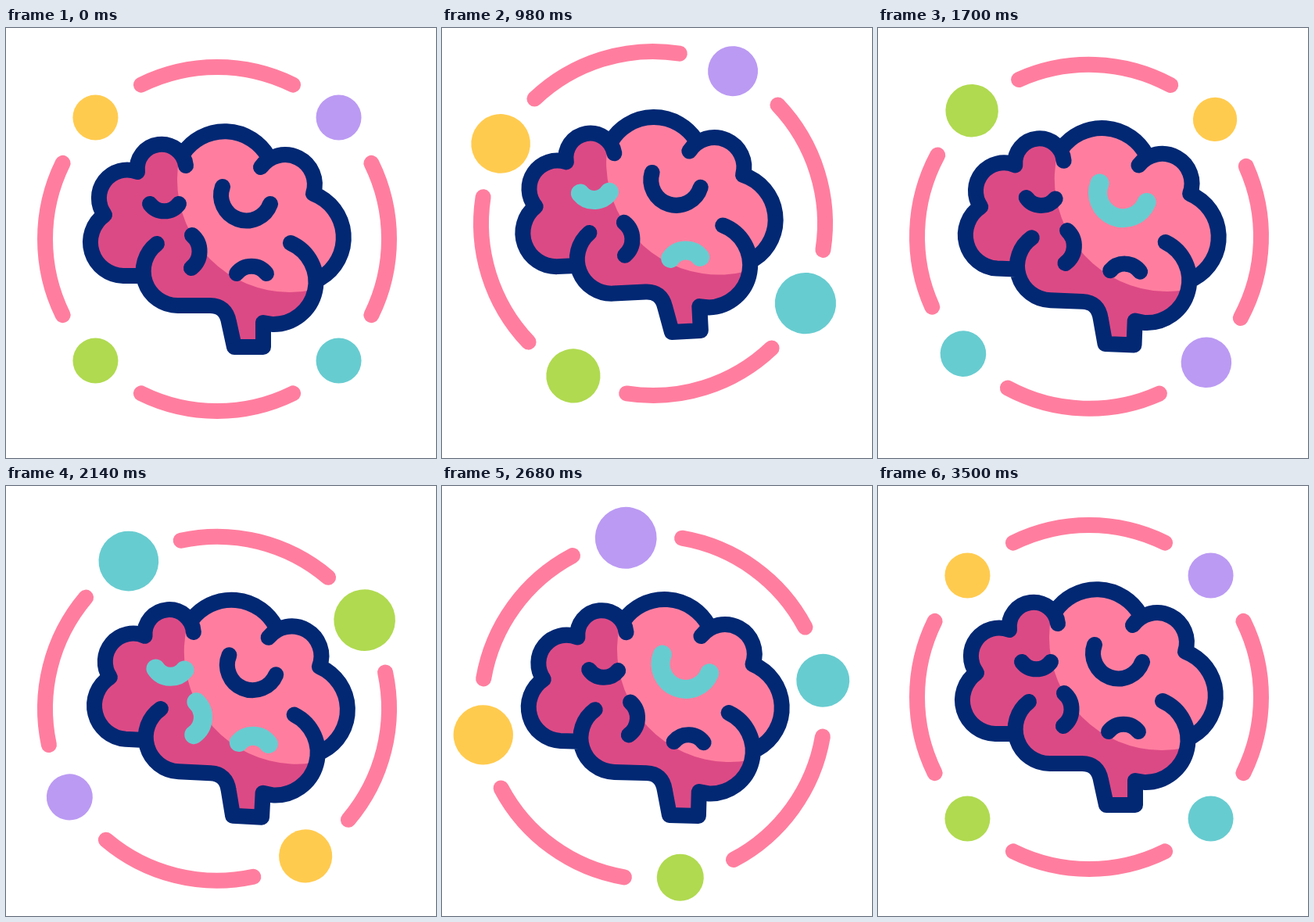
An HTML page with a canvas for the animation above (3.6 s loop, 550x550 px).

```html
<!DOCTYPE html>
<html lang="en">
<head>
<meta charset="utf-8">
<title>Brain</title>
<style>
  html, body { margin: 0; width: 100%; height: 100%; overflow: hidden; background: #fff; }
  canvas { display: block; }
</style>
</head>
<body>
<canvas id="stage" width="550" height="550"></canvas>
<script>
const ctx = document.getElementById('stage').getContext('2d');
const LOOP = 3600, STEP = 20, START = 140, END = 3500;
const CENTER = 270, RADIUS = 220;
const NAVY = '#022874', PINK = '#ff7e9f', ROSE = '#dc4a85', CYAN = '#67ccd0';
const rad = degrees => degrees * Math.PI / 180;
const clamp = x => Math.min(1, Math.max(0, x));

// Sine ease in and out.
const ease = (t, from, to) => (1 - Math.cos(Math.PI * clamp((t - from) / (to - from)))) / 2;

// Spin winds up backwards, then makes one full turn.
const spin = t => -25 * ease(t, START, 750) + 385 * ease(t, 750, 3305);

// One swing: from rest to a low point, to a high point and back to rest.
const swing = (t, low, lowAt, high, highAt) => low * ease(t, START, lowAt) +
  (high - low) * ease(t, lowAt, highAt) - high * ease(t, highAt, END);
const bob = t => swing(t, -21, 1120, 17, 2330);
const tilt = t => swing(t, -3, 880, 3, 1950);

// Two pulses, shared by all dots with a staggered delay.
const DELAY = 213;
const dotSize = t => 29 + 10.5 * ease(t, START, 700) - 11.5 * ease(t, 700, 1320) +
  11.5 * ease(t, 1320, 2080) - 10.5 * ease(t, 2080, 2830);
const dots = [
  { color: '#b0da50', angle: 225 },
  { color: CYAN, angle: 135 },
  { color: '#ffcb4f', angle: 315 },
  { color: '#bb9af3', angle: 45 }
];

const leftLobes = 'A43 43 0 0 1 126 239 A36 36 0 0 1 168 184 A31 31 0 0 1 230 176';
const topLobe = 'A64 64 0 0 1 335 164';
const rightLobes = 'A38 38 0 0 1 393 212 A60 60 0 0 1 402 320';
const base = 'A54.3 54.3 0 0 1 341 379 L329 377 V408 H292 L285 376 Q281 355 261 355 H220';
const body = new Path2D(`M150 317 ${leftLobes} L227 160 ${topLobe} L326 178 ${rightLobes}
  L396 323 ${base} A44 44 0 0 1 178 317 Z`);
const outline = new Path2D(`M174 317 H150 ${leftLobes} M227 160 ${topLobe}
  M326 178 ${rightLobes} M364 275 ${base} A44 44 0 0 1 193 276`);

// The folds take turns to light up.
const TURN = 520, FIRST_TURN = 420;
const folds = [
  ['M277 203 A32 32 0 0 0 338 225', [0, 2, 4]],
  ['M184 225 A23 23 0 0 0 221 225', [1, 3]],
  ['M295 314 A24 24 0 0 1 333 314', [1, 3]],
  ['M238 265 A27 27 0 0 1 237 307', [3]]
].map(([d, turns]) => ({ path: new Path2D(d), turns }));

function disc(x, y, r, color) {
  ctx.fillStyle = color;
  ctx.beginPath();
  ctx.arc(x, y, r, 0, 2 * Math.PI);
  ctx.fill();
}

function line(path, color, width) {
  ctx.strokeStyle = color;
  ctx.lineWidth = width;
  ctx.stroke(path);
}

function drawRing(t) {
  ctx.save();
  ctx.translate(CENTER, CENTER + bob(t));
  ctx.rotate(rad(spin(t)));
  for (let i = 0; i < 4; i++) {
    const arc = new Path2D();
    arc.arc(0, 0, RADIUS, rad(i * 90 - 26.2), rad(i * 90 + 26.2));
    line(arc, PINK, 20);
  }
  dots.forEach(({ color, angle }, i) => {
    const a = rad(angle);
    disc(RADIUS * Math.sin(a), -RADIUS * Math.cos(a), dotSize(t - i * DELAY), color);
  });
  ctx.restore();
}

function drawBrain(t) {
  ctx.save();
  ctx.translate(310, 370 + bob(t));
  ctx.rotate(rad(tilt(t)));
  ctx.translate(-310, -370);
  ctx.fillStyle = ROSE;
  ctx.fill(body);
  ctx.save();
  ctx.clip(body);
  disc(363, 194, 144, PINK);
  ctx.restore();
  line(outline, NAVY, 20);
  const turn = Math.floor((t - FIRST_TURN) / TURN);
  for (const { path, turns } of folds) {
    if (turns.includes(turn)) line(path, CYAN, 24);
    else line(path, NAVY, 20);
  }
  ctx.restore();
}

function draw(t) {
  ctx.fillStyle = '#fff';
  ctx.fillRect(0, 0, 550, 550);
  ctx.lineCap = ctx.lineJoin = 'round';
  drawRing(t);
  drawBrain(t);
}

const began = performance.now();
function tick() {
  const t = (performance.now() - began) % LOOP;
  draw(Math.floor(t / STEP) * STEP);
  requestAnimationFrame(tick);
}
tick();
</script>
</body>
</html>
```
